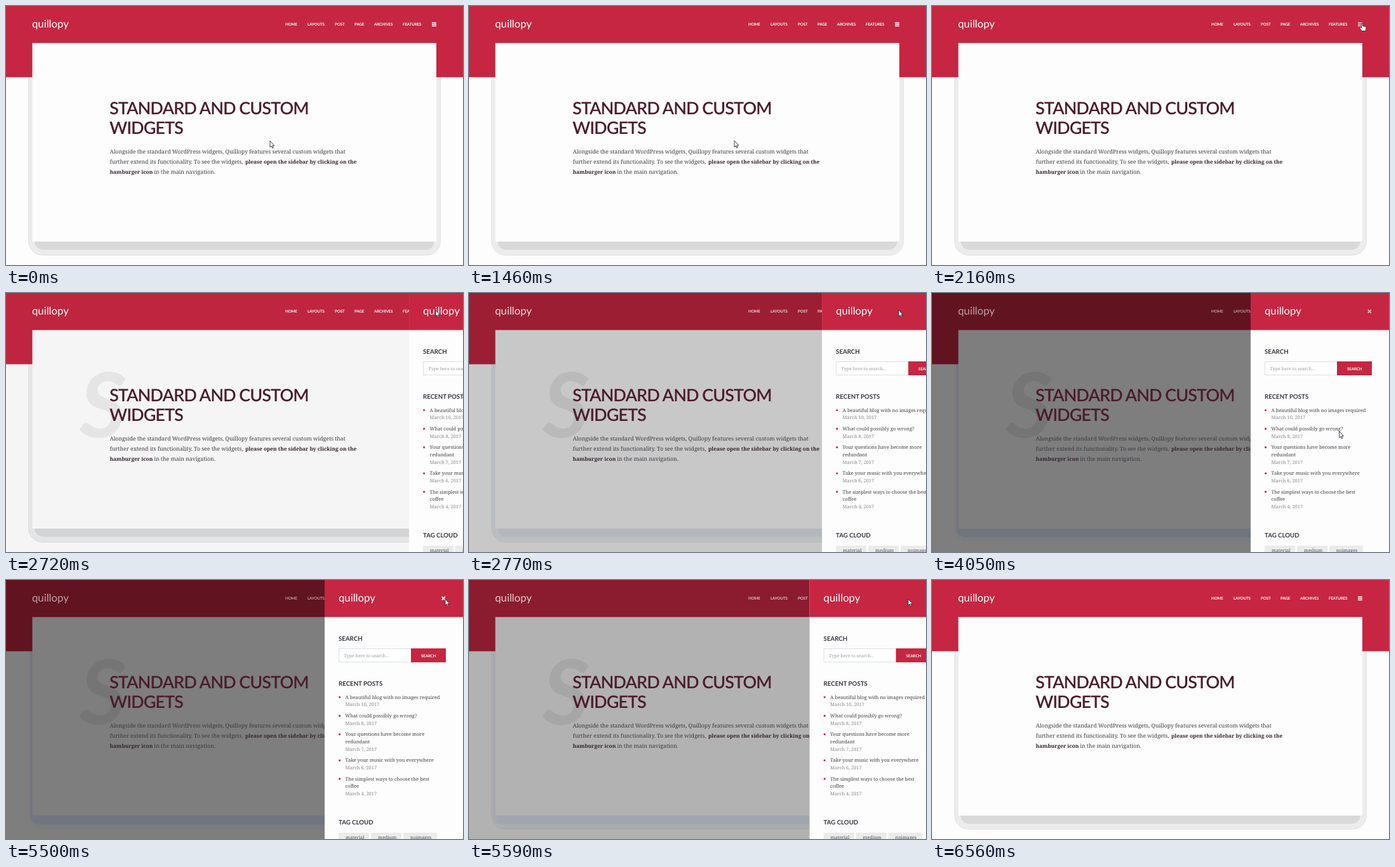
Write an HTML page that moves like this. It is 720 px wide and 409 px high and loops after 6960 ms.

```html
<!DOCTYPE html>
<html lang="en">
<head>
<meta charset="utf-8">
<title>Sidebar widgets</title>
<style>
  html, body { margin: 0; width: 100%; height: 100%; overflow: hidden; background: #fdfdfd; }
  svg { display: block; width: 100%; height: 100%; }
  text { font-family: "Noto Serif", serif; text-rendering: geometricPrecision; white-space: pre; }
  .logo { font: 16.7px Lato, sans-serif; fill: #fff; }
  .nav { font: 700 6.2px Lato, sans-serif; letter-spacing: -.1px; fill: #fff; }
  .title { font: 600 27px Lato, sans-serif; letter-spacing: -.95px; fill: #4a1c2b; }
  .body { font-size: 8.73px; fill: #3b3b41; }
  .strong { font-size: 8.3px; font-weight: 700; fill: #34242e; }
  .initial { font: italic 700 142px Lato, sans-serif; fill: #ececec; }
  .heading { font: 700 9.7px Lato, sans-serif; fill: #34353f; }
  .post { font-size: 7.62px; fill: #414148; }
  .date { font-size: 7.45px; fill: #88888c; }
  .hint { font-size: 7px; fill: #9b9b9f; }
  .tag { font-size: 7.3px; fill: #55555a; }
  .red { fill: #c62641; }
</style>
</head>
<body>
<svg viewBox="0 0 720 409" preserveAspectRatio="none">
  <rect width="720" height="409" fill="#fdfdfd"/>
  <g id="shadow">
    <rect x="35.5" y="80" width="649" height="313.5" rx="22" fill="#ececec" stroke="#e2e2e2"/>
    <rect x="45" y="80" width="630" height="305" rx="14" fill="#d9d9d9"/>
  </g>
  <rect id="glow" x="38" y="80" width="640" height="306" rx="14" fill="#dfeeff"/>
  <rect class="red" width="720" height="112.5"/>
  <rect x="41.5" y="58.5" width="636.5" height="313.5" fill="#fdfdfd"/>
  <text class="initial" id="initial" x="116" y="228">S</text>
  <rect id="shade" width="720" height="409"/>
  <g id="menu">
    <text class="logo" x="41" y="33.5">quillopy</text>
    <path id="burger" d="M671 26.5h7M671 29h7M671 31.5h7" stroke="#fff" stroke-width="1.3"/>
  </g>
  <g id="article"></g>
  <g id="sidebar">
    <rect x="502" width="218" height="409" fill="#fdfdfd"/>
    <rect class="red" x="502" width="218" height="58.5"/>
    <text class="logo" x="524" y="33.5">quillopy</text>
    <path id="close" d="M686.8 26.5l5 5m0-5l-5 5" stroke="#fff" stroke-width="1.9"/>
    <rect x="524.5" y="108.5" width="114" height="21" fill="#fff" stroke="#d9e0e4"/>
    <rect class="red" x="638" y="108" width="55" height="22"/>
  </g>
  <g id="cursor" stroke="#26263a" stroke-width=".9" stroke-linejoin="round" fill="#fff">
    <path id="arrow" d="M0 0V10L2.2 8 3.7 11.4 5.3 10.7 3.8 7.4H6.8Z"/>
    <path id="hand" d="M-.8 1Q0-.4 1 .8L1.8 4.5 6 5.5Q7.4 6 7 8L6 12.5H.5L-3.2 8Q-4 6.4-2 6.6L0 7.5Z"/>
  </g>
</svg>
<script>
const LOOP = 6960;
const $ = id => document.getElementById(id);

function add(parent, tag, attrs, content = '') {
  const node = document.createElementNS('http://www.w3.org/2000/svg', tag);
  for (const key in attrs) node.setAttribute(key, attrs[key]);
  node.textContent = content;
  parent.append(node);
}
const write = (parent, style, x, y, content) => add(parent, 'text', { class: style, x, y }, content);
const fade = (id, opacity) => $(id).setAttribute('opacity', opacity);
const move = (id, x, y) => $(id).setAttribute('transform', `translate(${x} ${y})`);

const menu = $('menu'), article = $('article'), sidebar = $('sidebar');

[[440, 'HOME'], [475, 'LAYOUTS'], [518, 'POST'], [549, 'PAGE'], [580, 'ARCHIVES'], [625, 'FEATURES']]
  .forEach(([x, label]) => write(menu, 'nav', x, 31.2, label));

write(article, 'title', 163, 171, 'STANDARD AND CUSTOM');
write(article, 'title', 163, 202, 'WIDGETS');
write(article, 'body', 163.5, 232.7, 'Alongside the standard WordPress widgets, Quillopy features several custom widgets that');
write(article, 'body', 163.5, 249, 'further extend its functionality. To see the widgets,');
write(article, 'body strong', 377, 249, 'please open the sidebar by clicking on the');
write(article, 'body strong', 163.5, 265.3, 'hamburger icon');
write(article, 'body', 233.2, 265.3, 'in the main navigation.');

write(sidebar, 'hint', 532.5, 122, 'Type here to search...');
write(sidebar, 'nav', 654, 121.7, 'SEARCH');
[[95.5, 'SEARCH'], [166.7, 'RECENT POSTS'], [386, 'TAG CLOUD']]
  .forEach(([y, label]) => write(sidebar, 'heading', 524, y, label));

const posts = [
  [187.6, 10, 'A beautiful blog with no images required'],
  [217, 8, 'What could possibly go wrong?'],
  [246.3, 7, 'Your questions have become more', 'redundant'],
  [287.4, 6, 'Take your music with you everywhere'],
  [316.5, 4, 'The simplest ways to choose the best', 'coffee'],
];
for (const [y, day, ...lines] of posts) {
  add(sidebar, 'circle', { class: 'red', cx: 525.6, cy: y - 2.6, r: 1.6 });
  lines.forEach((line, i) => write(sidebar, 'post', 534.5, y + i * 11.6, line));
  write(sidebar, 'date', 534.5, y + lines.length * 11.6, `March ${day}, 2017`);
}
[[524, 48, 'material'], [575, 48, 'medium'], [626, 53, 'noimages']].forEach(([x, width, label]) => {
  add(sidebar, 'rect', { x, y: 399, width, height: 20, fill: '#ebebeb' });
  write(sidebar, 'tag', x + 11, 409.3, label);
});

const clamp = x => Math.min(1, Math.max(0, x));
const smooth = u => u * u * (3 - 2 * u);
const easeIn = u => u ** 1.5;
const easeOut = u => 1 - (1 - u) ** 1.5;

// CSS "ease": cubic-bezier(.25, .1, .25, 1)
function cssEase(x) {
  let low = 0, high = 1;
  const curve = (s, a, b) => 3 * s * (1 - s) ** 2 * a + 3 * s * s * (1 - s) * b + s ** 3;
  for (let i = 0; i < 18; i++) {
    const mid = (low + high) / 2;
    if (curve(mid, .25, .25) < x) low = mid; else high = mid;
  }
  return curve(low, .1, 1);
}

// Pointer strokes: start, end, from, bend, to, easing
const strokes = [
  [1430, 2120, [416, 213], [590, 190], [677, 27], smooth],
  [3160, 3550, [677, 26], [610, 40], [537, 84], smooth],
  [3760, 4050, [537, 84], [565, 200], [641, 219], easeIn],
  [4050, 4460, [641, 219], [732, 150], [607, 53], easeOut],
  [4800, 5220, [607, 53], [650, 50], [692, 30], smooth],
  [6010, 6560, [692, 30], [706, 400], [548, 412], smooth],
];
function pointer(t) {
  const [start, end, from, bend, to, ease] = strokes.findLast(s => t >= s[0]) || strokes[0];
  const u = ease(clamp((t - start) / (end - start))), v = 1 - u;
  return from.map((p, i) => v * v * p + 2 * u * v * bend[i] + u * u * to[i]);
}

function draw(now) {
  const t = now % LOOP;
  const open = t < 5500 ? cssEase(clamp((t - 2664) / 236)) : 1 - cssEase(clamp((t - 5550) / 300));
  const dim = open ** 3;

  move('sidebar', 218 * (1 - open), 0);
  fade('shade', dim * .5);
  fade('glow', dim);
  fade('shadow', 1 - dim * .8);
  fade('initial', t >= 2660 && t < 5850 ? 1 : 0);
  fade('menu', 1 - dim * .4);

  const overBurger = t >= 2100 && t < 2660;
  fade('burger', overBurger ? .75 : 1);
  fade('close', t >= 5200 ? 1 : .65);
  fade('arrow', overBurger ? 0 : 1);
  fade('hand', overBurger ? 1 : 0);
  move('cursor', ...pointer(t));
  fade('cursor', t < 6560 ? 1 : 0);
}

const begin = performance.now();
function tick() {
  draw(performance.now() - begin);
  requestAnimationFrame(tick);
}
tick();
</script>
</body>
</html>
```
